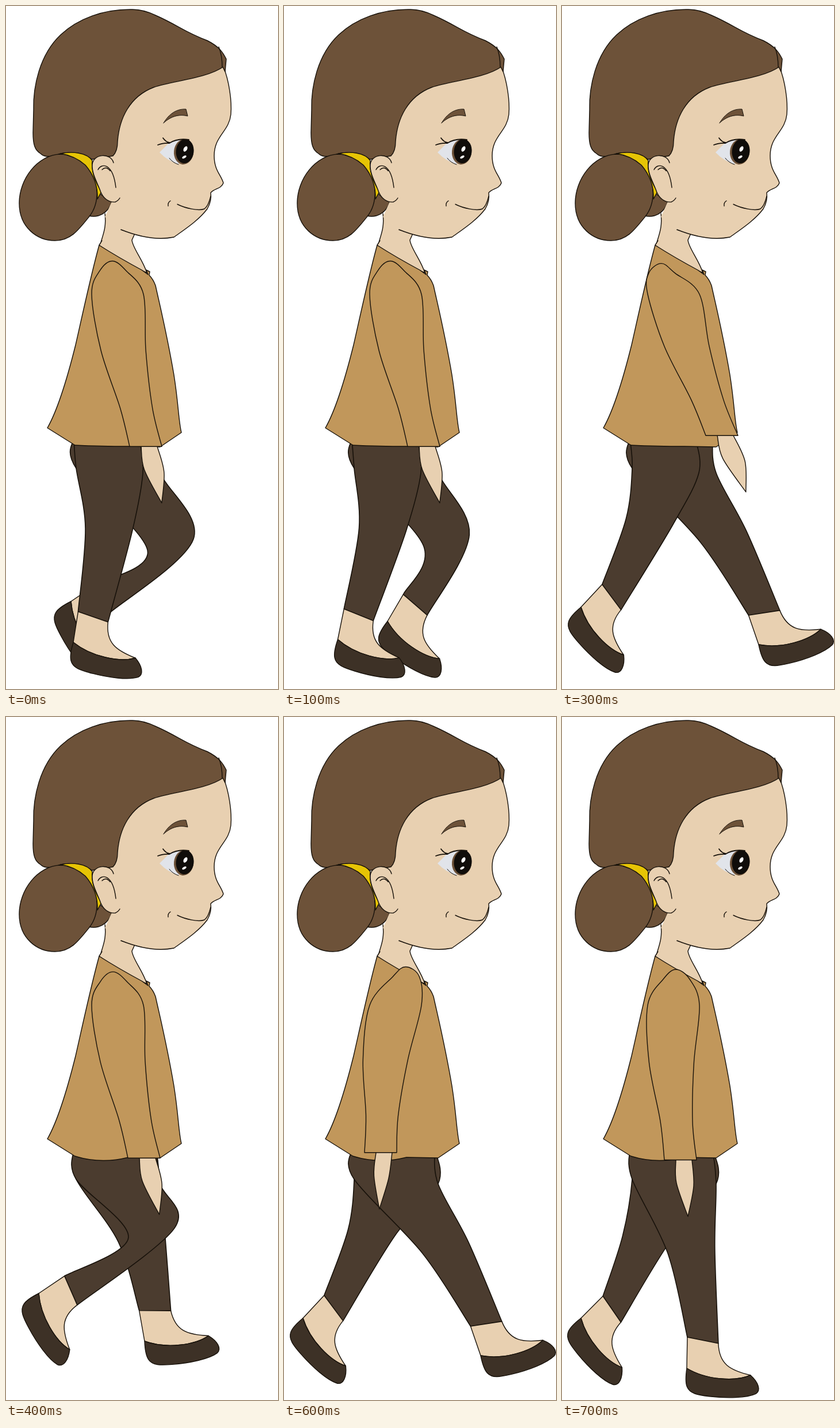
An HTML page with a canvas that plays this animation: 473 by 1185 pixels, repeating every 0.8 s.

```html
<!DOCTYPE html>
<html lang="en">
<head>
<meta charset="utf-8">
<title>Walk cycle</title>
<style>
html, body { margin: 0; width: 100%; height: 100%; overflow: hidden; background: #fff; }
canvas { display: block; }
</style>
</head>
<body>
<canvas id="stage" width="473" height="1185"></canvas>
<script>
const ctx = document.getElementById('stage').getContext('2d');
const STEP = 100;
const INK = '#17110a', HAIR = '#6d5239', SKIN = '#e8d0b1', SHIRT = '#c1975b',
      TROUSERS = '#4b3c2f', SHOE = '#3d3126', BAND = '#e6c405';
const KNEE = 41, HEM = 55, ANKLE = 54;

// A leg pose is its knee, the heel of its shoe and the tilt of the foot in degrees.
const leg = (kneeX, kneeY, heelX, heelY, tilt) => ({ kneeX, kneeY, heelX, heelY, tilt });
const halfway = (a, b) => leg(...Object.keys(a).map(k => (a[k] + b[k]) / 2));

const reach = leg(281, 921, 342, 1108, -19), trail = leg(152, 895, 33, 1043, 43);
const nearStand = leg(179, 908, 117, 1104, 9), nearBack = leg(164, 908, 70, 1094, 14);
const farLift = leg(286, 935, 113, 1033, 56), farSwing = leg(279, 919, 247, 1102, 5);

const nearLeg = [nearStand, halfway(nearStand, nearBack), nearBack, trail,
  leg(253, 895, 57, 1000, 56), leg(277, 916, 221, 1108, 0), reach, leg(225, 927, 217, 1130, 1)];
const farLeg = [farLift, halfway(farLift, farSwing), farSwing, reach,
  leg(236, 905, 241, 1083, -10), leg(157, 884, 90, 1067, 14), trail, leg(146, 906, 33, 1043, 45)];
const wristX = [243, 243, 243, 278, 240, 206, 168, 206];

function paint(path, fill, line = 1.4) {
  const shape = typeof path === 'string' ? new Path2D(path) : path;
  if (fill) { ctx.fillStyle = fill; ctx.fill(shape); }
  if (line) { ctx.lineWidth = line; ctx.strokeStyle = INK; ctx.stroke(shape); }
}

function oval(x, y, rx, ry, tilt, fill) {
  const shape = new Path2D();
  shape.ellipse(x, y, rx, ry, tilt, 0, 7);
  paint(shape, fill, 0);
}

// Joins each run of points with a smooth curve, and the runs with straight lines.
function outline(...runs) {
  const path = new Path2D();
  runs.forEach((pts, n) => {
    if (n) path.lineTo(...pts[0]); else path.moveTo(...pts[0]);
    for (let i = 0; i < pts.length - 1; i++) {
      const a = pts[i - 1] || pts[i], b = pts[i], c = pts[i + 1], d = pts[i + 2] || c;
      path.bezierCurveTo(b[0] + (c[0] - a[0]) / 6, b[1] + (c[1] - a[1]) / 6,
                         c[0] - (d[0] - b[0]) / 6, c[1] - (d[1] - b[1]) / 6, c[0], c[1]);
    }
  });
  return path;
}

function drawLeg({ kneeX, kneeY, heelX, heelY, tilt }, hipFront) {
  const hipBack = 118, hipY = 750;
  const turn = tilt * Math.PI / 180, c = Math.cos(turn), s = Math.sin(turn);
  const onFoot = (u, v) => [heelX + u * c - v * s, heelY + u * s + v * c];

  const hemBack = onFoot(0, -ANKLE), hemTurn = turn + 0.18;
  const hemFront = [hemBack[0] + HEM * Math.cos(hemTurn), hemBack[1] + HEM * Math.sin(hemTurn)];

  const skin = new Path2D();
  skin.moveTo(...hemBack);
  skin.lineTo(heelX, heelY);
  skin.bezierCurveTo(...onFoot(35, 20), ...onFoot(85, 22), ...onFoot(111, 10));
  skin.bezierCurveTo(...onFoot(75, 2), ...onFoot(56, -8), ...hemFront);
  paint(skin, SKIN);

  ctx.save();
  ctx.translate(heelX, heelY);
  ctx.rotate(turn);
  paint('M0,0C-2,15 -2,25 1,32C6,44 20,46 40,48C70,51 105,50 121,42C130,36 125,22 111,10C85,22 35,20 0,0', SHOE);
  ctx.restore();

  // The knee line leans half as much as the thigh.
  const lean = Math.atan2(kneeX - 190, kneeY - hipY) / 2;
  const dx = KNEE * Math.cos(lean), dy = KNEE * Math.sin(lean);
  paint(outline(
    [[hipBack, hipY], [hipBack + 4, 802], [kneeX - dx, kneeY + dy], hemBack],
    [hemFront, [kneeX + dx, kneeY - dy], [hipFront + 6, 810], [hipFront, hipY]]
  ), TROUSERS, 1.6);
}

function drawArm(x) {
  const y = 769 - 0.006 * (x - 215) ** 2, swing = x - 206;
  const topX = 198 - swing * 0.35, topY = 438 + swing * 0.12;

  const lean = swing * 0.4;
  paint(outline(
    [[x - 8, y], [x - 7 + lean * 0.3, y + 40], [x + 13 + lean, y + 98]],
    [[x + 13 + lean, y + 98], [x + 23 + lean * 0.6, y + 45], [x + 20, y]]
  ), SKIN);

  // Rows down the sleeve: distance along the arm, elbow lag, half width.
  const rows = [[0, 0, 45], [0.37, 8, 39], [0.75, 4, 28], [1, 0, 28]];
  const edge = side => rows.map(([k, lag, half]) =>
    [194 + (x - 194) * k - lag + side * half, 500 + (y - 500) * k]);
  paint(outline([
    ...edge(-1).reverse(), [topX - 22, topY + 17], [topX, topY], [topX + 24, topY + 17], ...edge(1)
  ], [[x + 28, y], [x - 28, y]]), SHIRT);
}

function drawShirt(hem) {
  paint('M172,360C175,385 168,398 165,410L162,415Q195,440 245,463C238,440 220,420 219,406L224,395L200,388', SKIN);
  paint(`M162,415C148,465 132,540 121,588C108,640 92,697 72,732L120,762Q165,${hem} 213,764L268,765L305,740C300,720 300,690 292,640C280,570 270,530 260,485Q256,474 249,467L250,461L244,458L247,466L236,458Q195,436 162,415L167,407`, SHIRT);
}

function drawHead() {
  paint('M157,322L184,339C178,360 160,368 144,364Z', HAIR);
  const profile = 'M378,105C388,130 393,165 391,188C388,218 362,225 362,260C362,285 374,293 378,307C374,318 362,316 356,324Q358,338 350,352C335,372 310,388 292,401C262,407 230,400 200,388';
  paint(profile + 'L172,366L184,339L163,318L160,265L190,250L200,180L255,130Z', SKIN, 0);
  paint(profile);
  paint('M298,344C312,351 335,356 345,352Q352,347 356,330M286,338Q281,341 282,347');
  paint('M60,256C50,250 47,240 47,220L48,180C47,140 58,85 95,50C125,22 170,5 220,6Q240,6 262,17C300,34 310,45 350,60C372,71 378,82 383,92L381,114L377,106C350,125 290,130 257,141C215,157 197,195 194,235Q194,252 186,260L150,266Q120,250 95,256Q70,266 60,256', HAIR);
  paint('M370,71Q376,86 376,106');
  paint('M95,257C55,258 23,300 23,342C23,385 55,407 85,407C112,407 125,390 145,365C163,342 162,305 146,282C130,262 110,257 95,257', HAIR);
  paint('M95,256C115,252 140,254 150,268C148,285 155,305 166,322L159,335C160,310 150,290 138,276Q120,260 95,256', BAND);
  paint('M187,272C182,254 152,256 150,275C149,290 158,305 163,318C168,335 180,341 190,340Q195,338 198,333', SKIN);
  paint('M160,284C166,272 186,272 191,315M167,284Q174,277 181,286');
  paint('M274,203C284,186 298,178 313,179L316,191C300,187 286,192 274,203', HAIR, 1);
  paint('M267,254L284,237Q298,229 310,232L300,275Q280,268 267,254', '#e1e4ea', 0);
  oval(309, 253, 17, 22, 0.1, HAIR);
  oval(311, 252, 15.5, 21, 0.1, '#100d0a');
  oval(312, 248, 3, 5, 0.5, '#fff');
  oval(310, 262, 4, 2, -0.5, '#fff');
  paint('M264,241Q275,237 284,238Q298,229 318,232M273,229Q278,236 284,237', null, 1.8);
  paint('M284,264Q290,272 300,275', null, 1);
}

function frame() {
  const step = Math.floor(performance.now() / STEP) % 8, farLeads = step < 4;
  ctx.fillStyle = '#fff';
  ctx.fillRect(0, 0, 473, 1185);
  ctx.lineJoin = ctx.lineCap = 'round';
  drawLeg(farLeg[step], 262);
  drawLeg(nearLeg[step], farLeads ? 232 : 262);
  drawShirt(farLeads ? 764 : 776);
  drawArm(wristX[step]);
  drawHead();
  requestAnimationFrame(frame);
}
frame();
</script>
</body>
</html>
```
